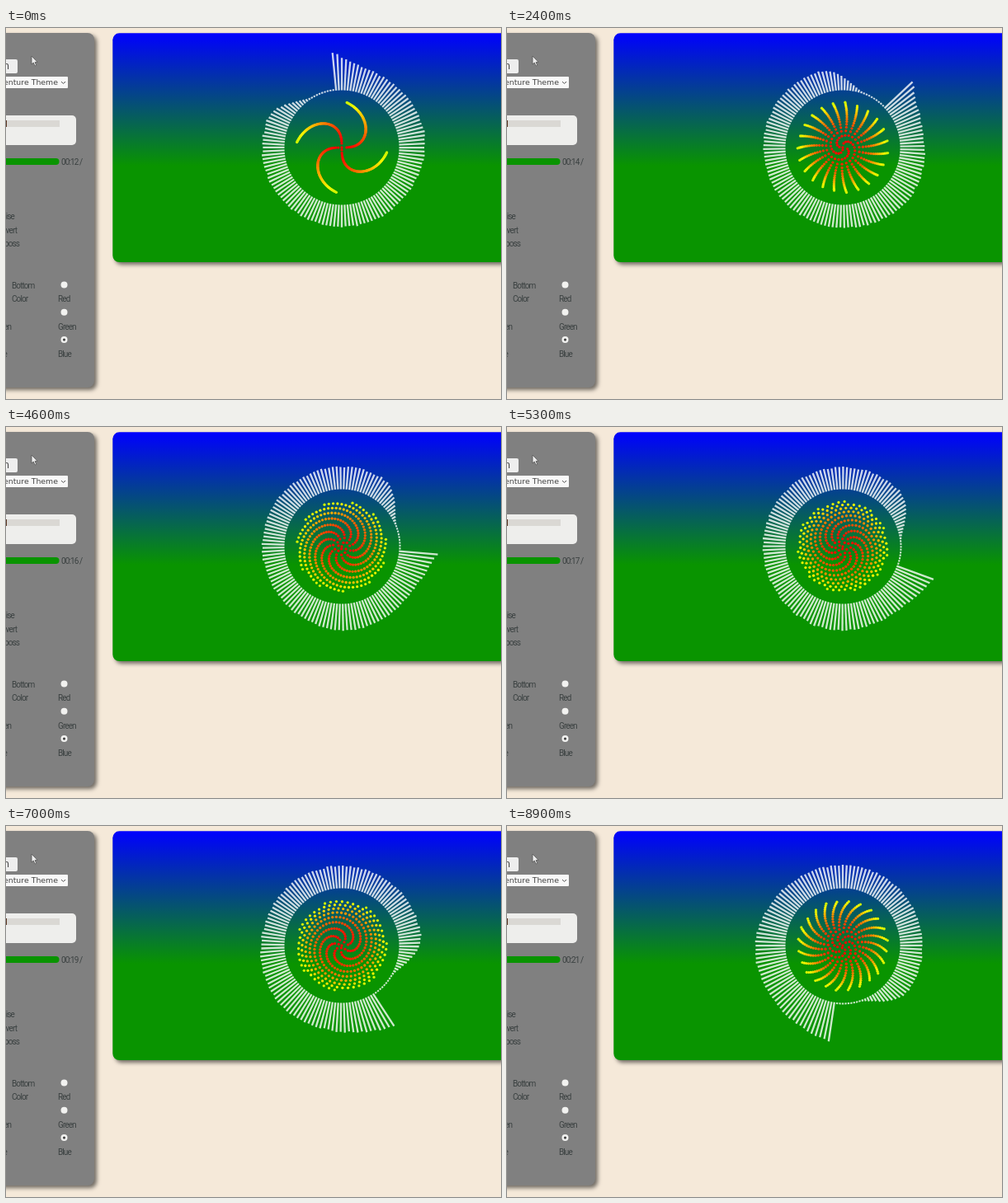
These frames come from a looping animation (600x450 px, 9 s). An HTML page with a canvas:

```html
<!DOCTYPE html>
<html lang="en">
<head>
<meta charset="utf-8">
<title>Audio visualizer</title>
<style>
  html, body { margin: 0; width: 100%; height: 100%; overflow: hidden; background: #f5e9d9; }
  canvas { display: block; }
</style>
</head>
<body>
<canvas id="stage" width="600" height="450"></canvas>
<script>
const ctx = document.getElementById('stage').getContext('2d');
const LOOP = 9000, STEP = 100, RAD = Math.PI / 180;
const CX = 407, CY = 145;
const BARS = 128, RING = 69.5;
const DOTS = 350, SPREAD = 55 / Math.sqrt(DOTS);
const PAPER = '#f5e9d9', GREEN = '#099400';

const mix = (a, b, k) => a + (b - a) * k;

function smooth(a, b, x) {
  const k = Math.min(1, Math.max(0, (x - a) / (b - a)));
  return k * k * (3 - 2 * k);
}

function noise(a, b) {
  const s = Math.sin(a * 12.9898 + b * 78.233) * 43758.5453;
  return s - Math.floor(s);
}

// Loud bass bars first, a slight mid hump, then a fall to silence
function barLength(i, ms) {
  const deg = i * 360 / BARS, k = ms / LOOP;
  const bass = 20 * Math.exp(-deg / mix(13, 55, k ** 3));
  const hump = 5 * Math.exp(-(((deg - 80) / 35) ** 2));
  const fall = 1 - smooth(295, 335, deg);
  const jitter = (noise(i, Math.floor(ms / 300)) - 0.5) * 2;
  return 2 + (25 + bass + hump + jitter) * fall;
}

function box(x, y, w, h, r, fill) {
  ctx.fillStyle = fill;
  ctx.beginPath();
  ctx.roundRect(x, y, w, h, r);
  ctx.fill();
}

function card(x, y, w, h, fill) {
  ctx.save();
  ctx.shadowColor = 'rgba(0,0,0,.55)';
  ctx.shadowOffsetX = ctx.shadowOffsetY = 3;
  ctx.shadowBlur = 5;
  box(x, y, w, h, 8, fill);
  ctx.restore();
}

function disc(x, y, r, fill) {
  ctx.fillStyle = fill;
  ctx.beginPath();
  ctx.arc(x, y, r, 0, 7);
  ctx.fill();
}

function label(str, x, y, align = 'left') {
  ctx.font = '10px Roboto, sans-serif';
  ctx.letterSpacing = '-0.9px';
  ctx.textAlign = align;
  ctx.fillStyle = '#3a4040';
  ctx.fillText(str, x, y);
}

function uiText(str, x, y, size) {
  ctx.font = size + 'px "DejaVu Sans", sans-serif';
  ctx.letterSpacing = '0px';
  ctx.textAlign = 'right';
  ctx.fillStyle = '#444';
  ctx.fillText(str, x, y);
}

function chevron(x, y) {
  ctx.strokeStyle = '#555';
  ctx.lineWidth = 1;
  ctx.beginPath();
  ctx.moveTo(x - 2.5, y - 1.5);
  ctx.lineTo(x, y + 1);
  ctx.lineTo(x + 2.5, y - 1.5);
  ctx.stroke();
}

function cursor(x, y) {
  ctx.beginPath();
  [[0, 0], [0, 10], [2.3, 8], [4, 12], [5.7, 11.3], [4.1, 7.5], [7, 7.3]]
    .forEach(([dx, dy]) => ctx.lineTo(x + dx, y + dy));
  ctx.closePath();
  ctx.fillStyle = '#eee';
  ctx.strokeStyle = '#555';
  ctx.lineWidth = 0.8;
  ctx.fill();
  ctx.stroke();
}

function panel(ms) {
  card(-40, 6, 147, 430, '#808080');
  ctx.textBaseline = 'middle';

  box(-30, 38, 44, 17, 2, '#eee');
  uiText('n', 4, 47, 12);
  box(-60, 59, 135, 14, 1, '#f8f8f8');
  uiText('Adventure Theme', 63, 66.5, 9.4);
  chevron(69.5, 66.5);

  box(-30, 106, 115, 36, 5, '#eeeeec');
  box(-30, 112, 95, 8, 0, '#dad8d4');
  box(-1, 112, 2, 8, 0, '#5a3420');
  box(-30, 158, 94.5, 8, 4, GREEN);
  label('00:' + Math.floor(12.2 + ms / 1000) + ' /', 67, 163);

  ['Noise', 'Invert', 'Emboss'].forEach((name, i) =>
    label(name, 10 + i * 3, 229.5 + i * 16.5, 'right'));
  label('Green', 6, 363, 'right');
  label('Blue', 1, 396, 'right');
  label('Bottom', 7, 313);
  label('Color', 7, 329.5);
  ['Red', 'Green', 'Blue'].forEach((name, i) => {
    const y = 311.5 + i * 33.3;
    disc(70.5, y, 4, '#f2f2f0');
    label(name, 63, y + 18);
  });
  disc(70.5, 378.1, 1.6, '#444');
  cursor(31, 34);
}

function backdrop() {
  const g = ctx.createLinearGradient(0, 6, 0, 167);
  g.addColorStop(0, '#0000ff');
  g.addColorStop(1, GREEN);
  card(129.3, 6.3, 500, 277.7, g);
}

function ring(ms) {
  const start = -95.6 + 21.8 * ms / 1000;
  ctx.fillStyle = 'rgba(255,255,255,.8)';
  for (let i = 0; i < BARS; i++) {
    ctx.save();
    ctx.translate(CX, CY);
    ctx.rotate((start + i * 360 / BARS) * RAD);
    ctx.fillRect(RING, -1.15, barLength(i, ms), 2.3);
    ctx.restore();
  }
}

// Phyllotaxis whose divergence angle slowly opens
function spiral(ms) {
  const turn = (89.76 + 1.72 * ms / 1000) * RAD;
  for (let n = 0; n < DOTS; n++) {
    const r = SPREAD * Math.sqrt(n), a = n * turn;
    disc(CX + r * Math.cos(a), CY + r * Math.sin(a), 1.65, `hsl(${n / 5},100%,48%)`);
  }
}

function draw(ms) {
  ctx.fillStyle = PAPER;
  ctx.fillRect(0, 0, 600, 450);
  panel(ms);
  backdrop();
  ring(ms);
  spiral(ms);
}

const begin = performance.now();
function tick() {
  const t = Math.max(0, performance.now() - begin) % LOOP;
  draw(Math.floor(t / STEP) * STEP);
  requestAnimationFrame(tick);
}
tick();
</script>
</body>
</html>
```
